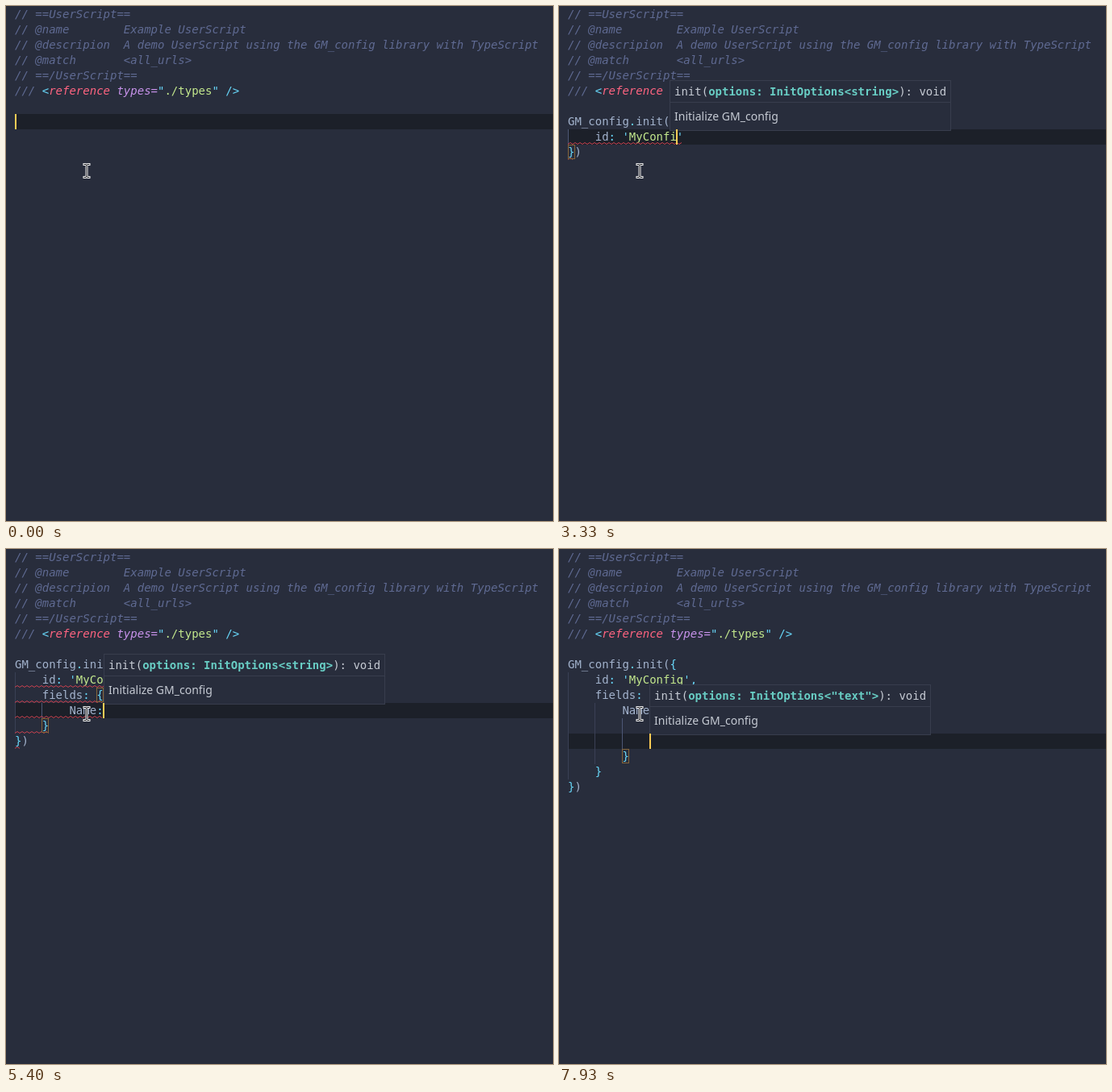
Write an HTML page with a canvas that moves like this. It is 678 by 639 pixels and loops after 8000 ms.

```html
<!DOCTYPE html>
<html lang="en">
<head>
<meta charset="utf-8">
<title>Typing with completions</title>
<style>
html, body { margin: 0; height: 100%; overflow: hidden; background: #282d3c; }
canvas { display: block; }
</style>
</head>
<body>
<canvas id="stage" width="678" height="639"></canvas>
<script>
const ctx = document.getElementById('stage').getContext('2d');
const LOOP = 8000, ROW = 19, LEFT = 11, FIRST = 7, LIST_W = 432;
const MONO = '"DejaVu Sans Mono", monospace';
const CODE = '14px ' + MONO, BOLD = 'bold ' + CODE, ITALIC = 'italic ' + CODE;
const SMALL = '11.9px ' + MONO, PROSE = '14px "Noto Sans", sans-serif';
const C = {
  bg: '#282d3c', line: '#1c2029', border: '#383d4d', comment: '#5f6a92', text: '#a2b2cc',
  cyan: '#68d8fa', green: '#c3e88d', red: '#ff6480', purple: '#c792ea', teal: '#68cdc4',
  caret: '#ffcc55', error: '#c8414f', bracket: '#85653a', popup: '#c5cad3', detail: '#767f99'
};
ctx.font = CODE;
const W = ctx.measureText('0'.repeat(100)).width / 100;
const colX = col => LEFT + col * W;
const lineY = line => 1 + line * ROW;

const header = [
  '// ==UserScript==',
  '// @name        Example UserScript',
  '// @descripion  A demo UserScript using the GM_config library with TypeScript',
  '// @match       <all_urls>',
  '// ==/UserScript=='
];
const reference = [
  ['/// ', C.comment, ITALIC], ['<', C.cyan, CODE], ['reference', C.red, ITALIC],
  [' types', C.purple, ITALIC], ['=', C.purple, CODE], ['"', C.cyan, CODE],
  ['./types', C.green, CODE], ['" />', C.cyan, CODE]
];

// [tick, characters, ticks per character]; a tick is 1/15 s
const keys = [
  [4, 'GM_config', 1], [14, '.'], [17, 'in'], [22, 'it', 1], [25, '('], [28, '{'], [32, '\n'],
  [34, 'id: ', 1], [40, "'"], [43, 'My', 1], [46, 'Config', 1], [53, "'"], [55, ','], [59, '\n'],
  [61, 'fie', 1], [64, 'lds'], [67, ':'], [69, ' '], [71, '{'], [74, '\n'],
  [76, 'N'], [79, 'am'], [80, 'e:'], [83, ' '], [84, '{'], [86, '\n'],
  [88, 'type', 1], [93, ': ', 1], [97, "'"], [107, 'te'], [108, 'x'], [110, 't'],
  [113, "'"], [116, ','], [118, '\n']
];

// from tick, to tick, all cubes, "label|detail" entries
const lists = [
  [4, 14, 1, 'GM_config|const GM_config: GM_configStruct;Generator;GeneratorFunction;getComputedStyle;getSelection;globalThis'],
  [14, 23, 1, 'center|(method) center(): void;close;create;fields;get;init|(method) init(options: InitOptions): void;isOpen;onInit;open;parser;read;stringify'],
  [34, 36, 0, 'id|(property) id: string;if|If Statement;ife|If-Else Statement;iife|Invoked Function;imd|Import Destructure;imp|Import Module;import|Import Statement;include|Include File;index|Index Of;info|Console Info;interval|Set Interval'],
  [61, 64, 0, 'fields|(property) fields: Record<string, Fi…;filters|filters;fin|forIn;fx-import|Angular Flex Layout Import;fx-item|Angular Flex Item;fx-item-align|Angular Flex Item Align;fx-item-fill|Angular Flex Item Fill;fx-item-offset|Angular Flex Item Offset;fx-item-order|Angular Flex Item Order;forin|For-In Loop;ng-filter|Angular 1 Filter;VueFilter|filter'],
  [76, 80, 0, 'ng-app|Angular 1 App;ng-bind|Angular 1 Bind;ng-class|Angular 1 Class;ng-click|Angular 1 Click;ng-filter|Angular 1 Filter;ng-form|Angular 1 Form;ng-hide|Angular 1 Hide;ng-if|Angular 1 If;ng-init|Angular 1 Init;ng-model|Angular 1 Model;ng-repeat|Angular 1 Repeat;ng-show|Angular 1 Show'],
  [88, 93, 0, 'type|(property) type: FieldTypes;typeof|Type Of;template|Template;then|Promise Then;throw|Throw Error;timeout|Set Timeout;try|Try-Catch'],
  [97, 113, 0, 'button;checkbox;float;hidden;int;integer;number;radio;select;text;textarea;unsigned int']
];

function stateAt(tick) {
  let before = '', after = '';
  for (const [start, chars, step = 0] of keys) {
    [...chars].forEach((ch, i) => {
      if (start + i * step > tick) return;
      if (ch === '\n') {
        const indent = before.split('\n').pop().match(/^ */)[0];
        const open = after[0] === '}';
        before += '\n' + indent + (open ? '    ' : '');
        if (open) after = '\n' + indent + after;
      } else if (ch === "'" && after[0] === "'") {
        before += ch;
        after = after.slice(1);
      } else {
        before += ch;
        after = ({ '(': ')', '{': '}', "'": "'" }[ch] || '') + after;
      }
    });
  }
  const lines = before.split('\n');
  return { before, after, line: FIRST + lines.length - 1, col: lines.pop().length };
}

function write(str, x, y, color, font = CODE) {
  ctx.font = font;
  ctx.fillStyle = color;
  ctx.fillText(str, x, y);
}

function rect(x, y, w, h, color) {
  ctx.fillStyle = color;
  ctx.fillRect(x, y, w, h);
}

function frame(x, y, w, h, color) {
  ctx.strokeStyle = color;
  ctx.lineWidth = 1;
  ctx.strokeRect(x + .5, y + .5, w - 1, h - 1);
}

function squiggle(line, from, to) {
  const y = lineY(line) + 18.5, end = colX(to);
  ctx.strokeStyle = C.error;
  ctx.lineWidth = 1;
  ctx.beginPath();
  for (let x = colX(from), i = 0; x <= end; x += 3, i++) ctx.lineTo(x, y - (i % 2) * 2);
  ctx.stroke();
}

function drawHeader() {
  header.forEach((str, i) => write(str, LEFT, lineY(i) + 14, C.comment, ITALIC));
  let col = 0;
  for (const [str, color, font] of reference) {
    write(str, colX(col), lineY(5) + 14, color, font);
    col += str.length;
  }
}

function drawCode(s, tick) {
  const lines = (s.before + s.after).split('\n');
  const indentOf = str => str.match(/^ */)[0].length;
  const active = indentOf(lines[s.line - FIRST]);
  const errors = tick >= 44 && tick < 113;
  rect(LEFT, lineY(s.line), 678 - LEFT, ROW, C.line);
  lines.forEach((str, i) => {
    const y = lineY(FIRST + i), indent = indentOf(str);
    for (let g = 0; g < indent; g += 4) {
      rect(Math.floor(colX(g)), y, 1, ROW, g === active - 4 ? '#4c5775' : '#3a4055');
    }
    let quoted = false;
    [...str].forEach((ch, k) => {
      const quote = ch === "'";
      if (quote) quoted = !quoted;
      const color = quote || (!quoted && '{}.:,'.includes(ch)) ? C.cyan : quoted ? C.green : C.text;
      write(ch, colX(k), y + 14, color);
    });
    if (errors) {
      const last = i === lines.length - 1;
      squiggle(FIRST + i, i ? 0 : str.length - 1, last ? 1 : str.length);
    }
  });
  if (tick >= 20 && tick < 25) squiggle(FIRST, 10, 12);
  drawBrackets(s);
}

function drawBrackets({ before, after }) {
  const open = Math.max(before.lastIndexOf('('), before.lastIndexOf('{'));
  if (open < 0) return;
  const all = before + after;
  for (const pos of [open, before.length + after.search(/[)}]/)]) {
    const lines = all.slice(0, pos).split('\n');
    const y = lineY(FIRST + lines.length - 1);
    frame(Math.floor(colX(lines.pop().length)), y, 9, 18, C.bracket);
  }
}

function drawSignature(s, tick) {
  const late = stateAt(tick - 1);
  if (!late.before.includes('(')) return;
  const { line, col } = late.line === s.line ? late : s;
  const type = tick < 86 ? 'string' : tick < 113 ? 'any' : '"text"';
  const option = `options: InitOptions<${type}>`;
  const x = Math.round(colX(col)) + (s.before.endsWith('id:') ? 6 : 0);
  const y = lineY(line) - 61;
  const w = Math.round((option.length + 12) * W) + 12;
  rect(x, y, w, 63, C.bg);
  frame(x, y, w, 63, C.border);
  rect(x + 1, y + 27, w - 2, 1, C.border);
  write('init(', x + 6, y + 19, C.popup);
  write(option, x + 6 + 5 * W, y + 19, C.teal, BOLD);
  write('): void', x + 6 + (5 + option.length) * W, y + 19, C.popup);
  write('Initialize GM_config', x + 6, y + 50, C.popup, PROSE);
}

// positions of the typed letters within a label, or null
function match(label, word) {
  const hits = [];
  let from = 0;
  for (const ch of word.toLowerCase()) {
    const at = label.toLowerCase().indexOf(ch, from);
    if (at < 0) return null;
    hits.push(at);
    from = at + 1;
  }
  return hits;
}

function icon(x, y, cube) {
  ctx.lineWidth = 1;
  if (cube) {
    ctx.strokeStyle = '#75beff';
    ctx.stroke(new Path2D(`M${x + 5} ${y + 8}l8-4 6 3v5l-8 4-6-3zl6 3 8-4m-8 4v5`));
    return;
  }
  ctx.strokeStyle = '#c5c9d2';
  ctx.beginPath();
  ctx.moveTo(x + 5.5, y + 15.5);
  ctx.lineTo(x + 5.5, y + 3.5);
  ctx.lineTo(x + 17.5, y + 3.5);
  ctx.lineTo(x + 17.5, y + 15.5);
  ctx.stroke();
  for (let k = 5; k < 18; k += 2) rect(x + k, y + 16, 1, 1, '#c5c9d2');
}

function drawList(s, tick) {
  const list = lists.find(([from, to]) => tick >= from && tick < to);
  if (!list) return false;
  const word = s.before.match(/\w*$/)[0];
  const rows = list[3].split(';')
    .map((entry, i) => {
      const [label, detail = ''] = entry.split('|');
      return { label, detail, hits: match(label, word), cube: list[2] || (i === 0 && list[0] !== 76) };
    })
    .filter(row => row.hits)
    .sort((a, b) => b.label.startsWith(word) - a.label.startsWith(word));
  if (!rows.length) return false;
  const chosen = tick >= 102 && tick < 107 ? Math.min(3, tick - 101) * 3 : 0;
  const x = Math.round(colX(s.col)), y = lineY(s.line + 1), h = rows.length * ROW + 4;
  rect(x, y, LIST_W, h, C.bg);
  rows.forEach(({ label, detail, hits, cube }, i) => {
    const top = y + 1 + i * ROW, on = i === chosen;
    if (on) rect(x + 1, top, LIST_W - 2, ROW, C.line);
    icon(x, top, cube);
    [...label].forEach((ch, k) => {
      const hit = hits.includes(k);
      write(ch, x + 23 + k * W, top + 14, hit || on ? C.teal : C.text, hit ? BOLD : CODE);
    });
    if (!detail || (list[2] && !on)) return;
    const long = on && detail.length > 12;
    ctx.textAlign = 'right';
    write(detail, x + (long ? 407 : 421), top + 13, on ? '#5b9b98' : C.detail, SMALL);
    ctx.textAlign = 'left';
    if (long) {
      ctx.strokeStyle = C.popup;
      ctx.stroke(new Path2D(`M${x + 410} ${top + 5}l4 4-4 4`));
    }
  });
  if (rows.length === 12) rect(x + 422, y + 1, 9, 132, 'rgba(90,100,130,.22)');
  frame(x, y, LIST_W, h, C.border);
  return x <= 100 && y <= 204 && y + h > 204;
}

const beam = new Path2D('M97 196.5h2l1 1 1-1h2M100 197v15M97 212.5h2l1-1 1 1h2');
const hand = new Path2D('M97 206q1-3 4-1l3 6 4 1q3 1 2 5l-1 4v3h-10l-1-3-6-3q-2-3 2-3l5 1z');

function drawPointer(overList) {
  ctx.lineJoin = 'round';
  ctx.lineCap = 'square';
  if (overList) {
    ctx.fillStyle = '#e9e9e9';
    ctx.strokeStyle = '#1b1d24';
    ctx.lineWidth = 1.5;
    ctx.stroke(hand);
    ctx.fill(hand);
  } else {
    for (const [width, color] of [[3, '#f4f4f4'], [1, '#15171c']]) {
      ctx.lineWidth = width;
      ctx.strokeStyle = color;
      ctx.stroke(beam);
    }
  }
  ctx.lineJoin = 'miter';
  ctx.lineCap = 'butt';
}

function draw(now) {
  const tick = Math.floor((now % LOOP + 4) * .015);
  const s = stateAt(tick);
  rect(0, 0, 678, 639, C.bg);
  drawHeader();
  drawCode(s, tick);
  drawSignature(s, tick);
  const blink = tick >= 104 && tick < 107;
  if (!blink) rect(Math.floor(colX(s.col)), lineY(s.line), 2, ROW, C.caret);
  drawPointer(drawList(s, tick));
}

let begin;
function loop(now) {
  begin ??= now;
  draw(now - begin);
  requestAnimationFrame(loop);
}
draw(0);
requestAnimationFrame(loop);
</script>
</body>
</html>
```
